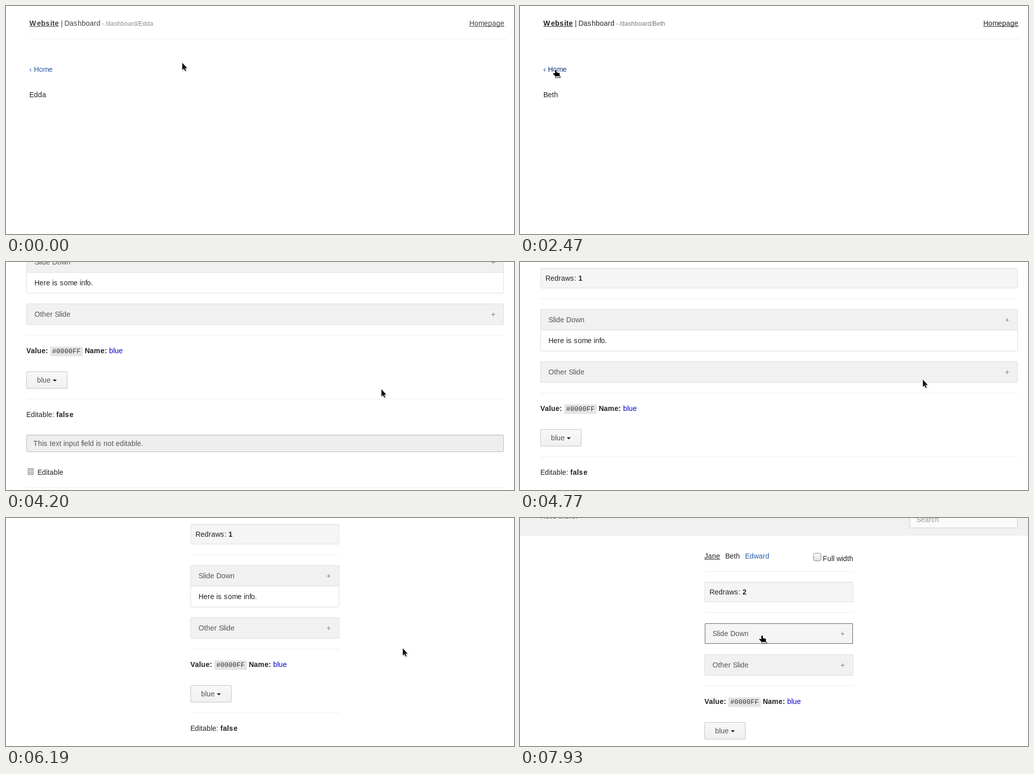
An HTML page that plays this animation: 1000x450 px, repeating every 8 s.

```html
<!DOCTYPE html>
<html lang="en">
<head>
<meta charset="utf-8">
<title>Website</title>
<style>
html, body { margin: 0; width: 100%; height: 100%; overflow: hidden; background: #fff; }
svg { display: block; }
text { font-family: "Liberation Sans", Arial, sans-serif; font-size: 14px; font-kerning: none; }
.bold { font-weight: bold; }
.small { font-size: 12px; }
.mono { font-family: "Liberation Mono", monospace; font-size: 13px; }
</style>
</head>
<body>
<svg id="stage" width="1000" height="450" viewBox="0 0 1000 450"></svg>
<script>
const LOOP = 8000, TICK = 114, FADE = 600;
const stage = document.getElementById('stage');
const ctx = document.createElement('canvas').getContext('2d');
const INK = '#222', GREY = '#555', BLUE = '#2a5ca8', LINE = '#ddd';

// Whole-pixel glyph advances, as on a hinted screen
const SANS = '"Liberation Sans", Arial, sans-serif';
const FONTS = {
  '': { font: '14px ' + SANS, widths: { s: 8, m: 11, M: 11, f: 3, '|': 3 } },
  bold: { font: 'bold 14px ' + SANS, widths: { W: 15, s: 9, m: 13 } },
  small: { font: '12px ' + SANS, widths: {} },
  mono: { font: '13px "Liberation Mono", monospace', widths: {} }
};

function advance(ch, cls) {
  const { font, widths } = FONTS[cls];
  if (!(ch in widths)) {
    ctx.font = font;
    widths[ch] = Math.round(ctx.measureText(ch).width);
  }
  return widths[ch];
}

const textWidth = (str, cls = '') => [...str].reduce((w, ch) => w + advance(ch, cls), 0);

const fillRect = (x, y, w, h, fill, r = 0) =>
  `<rect x="${x}" y="${y}" width="${w}" height="${h}" fill="${fill}" rx="${r}"/>`;
const box = (x, y, w, h, fill, stroke = LINE, r = 1.5) =>
  `<rect x="${x + 0.5}" y="${y + 0.5}" width="${w - 1}" height="${h - 1}" rx="${r}" fill="${fill}" stroke="${stroke}"/>`;
const dotted = (x, y, w, h) =>
  `<rect x="${x + 0.5}" y="${y + 0.5}" width="${w - 1}" height="${h - 1}" fill="none" stroke="#000" stroke-dasharray="1 1" shape-rendering="crispEdges"/>`;
const rule = (x0, x1, y) => fillRect(x0, y, x1 - x0, 1, '#eee');

function label(x, y, str, fill = INK, cls = '', underline = false) {
  const xs = [...str].map((_, i) => x + textWidth(str.slice(0, i), cls));
  return `<text class="${cls}" x="${xs.join(' ')}" y="${y}" fill="${fill}">${str}</text>` +
    (underline ? fillRect(x, y + 1, textWidth(str, cls), 1, fill) : '');
}

// Runs of labels laid out left to right
function row(x, y, gap, parts) {
  return parts.map(([str, fill, cls, underline]) => {
    const s = label(x, y, str, fill, cls, underline);
    x += textWidth(str, cls) + gap;
    return s;
  }).join('');
}

const clamp = (v, lo = 0, hi = 1) => Math.max(lo, Math.min(hi, v));
const smooth = k => k * k * (3 - 2 * k);
const ease = (t, from, to) => smooth(clamp((t - from) / (to - from)));

// Pages: time of the click, dashboard name or '' for home
const PAGES = [[-520, 'Edda'], [560, ''], [1720, 'Beth'], [2740, '']];
const CHECK = 3650, UNCHECK = 5520, PRESS = 7480, TOGGLE = 7540;

// Pointer moves: from, to, destination
const BACK = [70, 126], REST = [781, 257];
const MOVES = [
  [60, 430, BACK], [890, 1370, [416, 197]], [1370, 1560, [417, 191]],
  [1760, 2470, BACK], [2760, 3470, [600, 192]], [3700, 4200, [739, 251]],
  [4390, 5400, [908, 191]], [5560, 5840, REST],
  [6720, 6810, [637, 205]], [6810, 6980, [530, 145]], [6980, 7320, [476, 232]]
];

function pointerAt(t) {
  let x = 347, y = 112;
  for (const [from, to, [tx, ty]] of MOVES) {
    const k = ease(t, from, to);
    x += (tx - x) * k;
    y += (ty - y) * k;
  }
  return { x: Math.round(x), y: Math.round(y) };
}

// Wheel runs: start, signed ticks, gap between ticks
const WHEEL = [[3790, 3, 90], [4390, -3, 410], [6050, 3, 100], [6530, -2, 50]];

const scrollAt = t => WHEEL.reduce((sum, [start, n, gap]) =>
  sum + Math.sign(n) * TICK * clamp(Math.floor((t - start) / gap) + 1, 0, Math.abs(n)), 0);

function stateAt(t) {
  const [start, name] = PAGES.filter(p => p[0] <= t).pop();
  const wide = t >= CHECK && t < UNCHECK;
  const [l, r] = wide ? [40, 980] : [363, 656];
  const scroll = scrollAt(t), p = pointerAt(t);
  const over = (x, y, w, h) =>
    p.x >= x && p.x <= x + w && p.y + 3 + scroll >= y && p.y + 3 + scroll <= y + h;
  return {
    name, wide, l, r, scroll, p,
    alpha: clamp((t - start) / FADE),
    back: name && over(46, 117, 46, 16),
    nav: !name && over(l + 41, 182, 29, 14),
    full: !name && over(r - 79, 183, 79, 18),
    slide: !name && over(l, 321, r - l, 42),
    focus: t >= CHECK && t < PRESS,
    pressed: t >= PRESS,
    count: (t >= CHECK) + (t >= TOGGLE),
    drop: Math.round(41 * (1 - ease(t, TOGGLE, TOGGLE + 380)))
  };
}

function pointer({ p, back, nav, full, slide }) {
  const hand = back || nav || full || slide;
  const shape = hand
    ? `<path d="M0 16.5H11V12H0Z" fill="#000" opacity=".25"/>
       <path d="M-1 1Q.5 -1 2 1V5L8 6.5V12H-1L-5 8L-4 6L-1 7.5Z" fill="#000" stroke="#fff" stroke-width="2" paint-order="stroke"/>
       <path d="M-.5 12.5H8.5V15.5H-.5Z" fill="#fff" stroke="#333"/>`
    : `<path d="M1 1V17.5L4.5 14.5L7 18.5L9.5 17.5L8 12.5H12Z" fill="#000" opacity=".2"/>
       <path d="M0 0V14.6L3.2 11.6L5.4 16.4L7.4 15.5L5.4 10.8H9.6Z" fill="#111" stroke="#fff" stroke-width="1.6" paint-order="stroke"/>`;
  return `<g transform="translate(${p.x} ${p.y})">${shape}</g>`;
}

function header(x, title, path, linkX, links, alpha) {
  return `<g opacity="${alpha.toFixed(3)}">` +
    row(x, 39, 4, [['Website', INK, 'bold', true], ['|'], [title]]) +
    label(x + 72 + textWidth(title), 39, '- ' + path, '#777', 'small') +
    row(linkX, 39, 10, links.map(s => [s, INK, '', true])) + '</g>' +
    rule(x, x + 940, 64);
}

function dashboard({ name, alpha, back }) {
  return header(46, 'Dashboard', '/dashboard/' + name, 912, ['Homepage'], alpha) +
    label(46, 130, '‹ Home', back ? '#123a80' : BLUE) + label(46, 180, name);
}

function checkbox(x, y, on, focus) {
  return box(x, y, 16, 16, 'url(#tick)', '#858585', 3) +
    (focus ? dotted(x, y, 16, 16) + dotted(x + 1, y + 1, 14, 14) : '') +
    (on ? `<path d="M${x + 4} ${y + 8}l3 4l5 -8" fill="none" stroke="#333" stroke-width="2"/>` : '');
}

const slideHead = (l, r, y, title, fill) =>
  box(l, y, r - l, 42, fill) + label(l + 16, y + 26, title, GREY) + label(r - 25, y + 26, '+', '#777');

// Field with a soft inner shadow along its top
const well = (x, y, w, h, fill, stroke, shade) =>
  box(x, y, w, h, fill, stroke) + fillRect(x + 1, y + 1, w - 2, 1, shade);

function banner() {
  return fillRect(0, 85, 1000, 64, '#f1f1f1') + label(40, 115, 'Hello there!') +
    well(767, 100, 213, 34, '#fbfbfb', '#ccc', '#eee') + label(780, 122, 'Search', '#999');
}

function controls({ l, r, wide, focus, full, count }) {
  return row(l, 194, 10, [['Jane', INK, '', true], ['Beth'], ['Edward', BLUE]]) +
    checkbox(r - 79, 183, wide, focus) +
    label(r - 60, 199, 'Full width', full ? '#000' : INK) + rule(l, r, 219) +
    well(l, 240, r - l, 40, '#f5f5f5', '#e0e0e0', '#ececec') +
    row(l + 10, 265, 4, [['Redraws:'], [String(count), INK, 'bold']]) + rule(l, r, 300);
}

function slider({ l, r, drop, slide, pressed }) {
  const w = r - l;
  const panel = drop > 0
    ? `<svg x="${l}" y="362" width="${w}" height="${drop + 1}">` +
      box(0, 0, w, drop + 1, '#fff') + label(16, 26, 'Here is some info.') + '</svg>'
    : '';
  return panel + slideHead(l, r, 321, 'Slide Down', slide ? '#f5f5f5' : '#f1f1f1') +
    (pressed ? dotted(l + 1, 322, w - 2, 40) : '');
}

function form({ l, r }) {
  const cells = [0, 1, 2, 3].map(i => box(l + 5 + (i % 2) * 4, 751 + (i >> 1) * 5, 3, 4, 'none', '#999', 0));
  return slideHead(l, r, 424, 'Other Slide', '#f1f1f1') + rule(l, r, 486) +
    fillRect(l + 47, 509, 64, 19, '#e5e5e5', 2) + label(l + 51, 522, '#0000FF', '#333', 'mono') +
    label(l, 522, 'Value:', INK, 'bold') +
    row(l + 115, 522, 4, [['Name:', INK, 'bold'], ['blue', '#0000cd']]) +
    box(l, 558, 81, 34, 'url(#button)', '#c4c4c4') + label(l + 21, 580, 'blue', GREY) +
    `<path d="M${l + 52} 574h8l-4 4z" fill="#222"/>` + rule(l, r, 612) +
    row(l, 648, 4, [['Editable:'], ['false', INK, 'bold']]) +
    well(l, 683, r - l, 34, '#eee', '#bbb', '#e2e2e2') +
    label(l + 14, 705, 'This text input field is not editable.', GREY) +
    box(l + 3, 749, 11, 13, '#fff', '#777', 0) + cells.join('') +
    label(l + 22, 762, 'Editable') + rule(l, r, 787);
}

function home(s) {
  return `<g transform="translate(0 ${-s.scroll})">` +
    header(40, 'Home', '/', 844, ['Edda', 'Brock', 'Miriam'], s.alpha) +
    banner() + controls(s) + slider(s) +
    `<g transform="translate(0 ${s.drop - 41})">${form(s)}</g></g>`;
}

const gradient = (id, a, b) =>
  `<linearGradient id="${id}" x2="0" y2="1"><stop stop-color="${a}"/><stop offset="1" stop-color="${b}"/></linearGradient>`;
const DEFS = `<defs>${gradient('tick', '#fbfbfb', '#dedede')}${gradient('button', '#f8f8f8', '#f0f0f0')}</defs>`;
let shown = '';

function draw(t) {
  const s = stateAt(t);
  const markup = DEFS + (s.name ? dashboard(s) : home(s)) + pointer(s);
  if (markup !== shown) stage.innerHTML = shown = markup;
}

const begin = performance.now();
function tick(now) {
  draw(Math.max(0, now - begin) % LOOP);
  requestAnimationFrame(tick);
}
draw(0);
requestAnimationFrame(tick);
</script>
</body>
</html>
```
